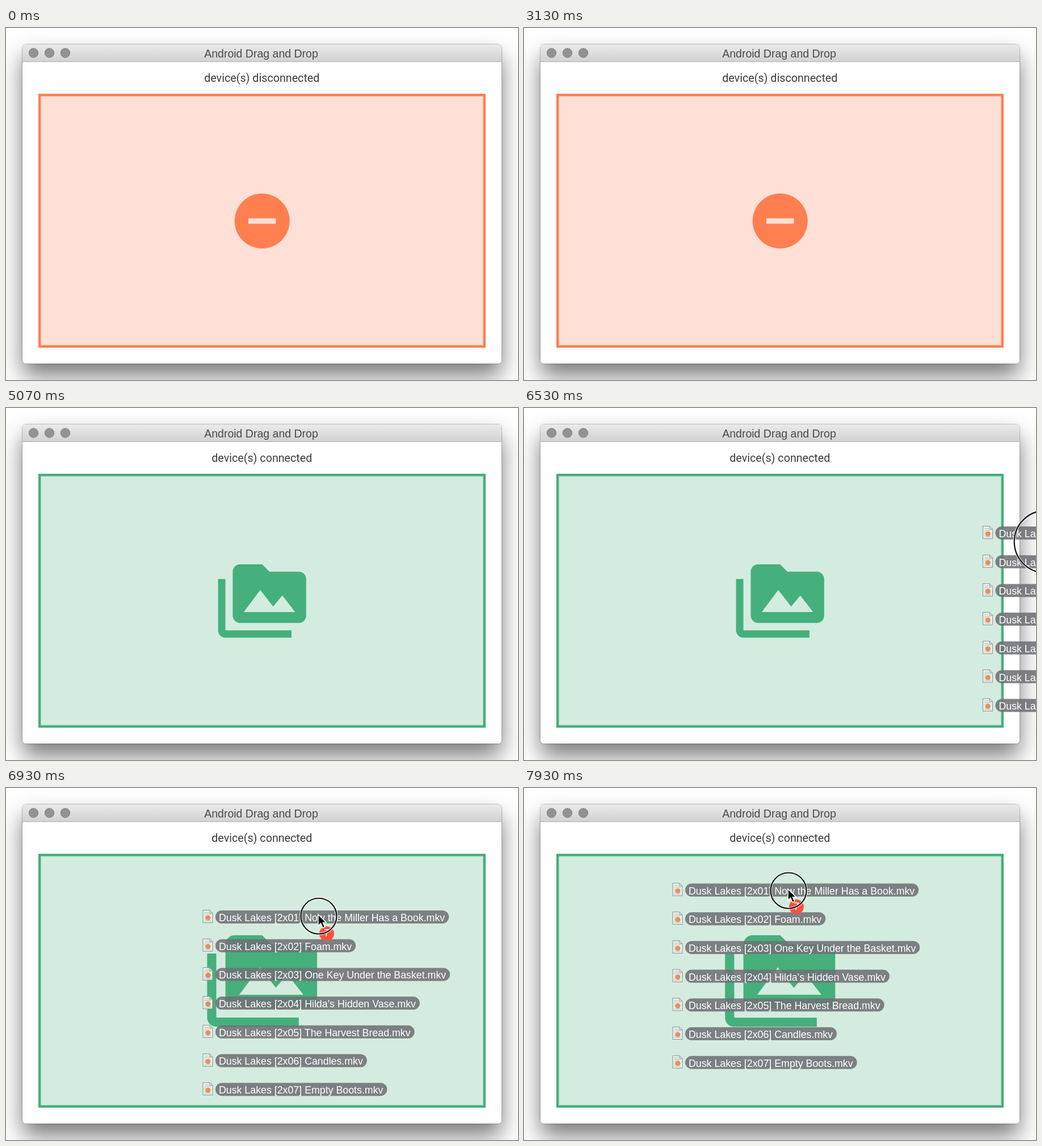
These frames come from a looping animation (902x621 px, 8 s). An HTML page:

```html
<!DOCTYPE html>
<html lang="en">
<head>
<meta charset="utf-8">
<title>Drag and Drop</title>
<style>
  html, body { margin: 0; width: 902px; height: 621px; overflow: hidden; background: #fff; }
  #win {
    position: absolute; left: 29px; top: 28.5px; width: 844px; height: 563.5px;
    background: #fff; border-radius: 6px; overflow: hidden;
  }
  #shadow {
    position: absolute; left: 29px; top: 28.5px; width: 844px; height: 563.5px; border-radius: 6px;
    box-shadow: 0 0 1px 0.5px rgba(0,0,0,.4), 0 22px 40px rgba(0,0,0,.52);
  }
  #bar {
    height: 30px; border-bottom: 1px solid #b3b2b3;
    background: linear-gradient(#ebeaeb, #d3d2d3);
  }
  svg { position: absolute; left: 0; top: 0; }
  text { font-family: "Liberation Sans", Arial, sans-serif; }
  #status { font: 19.7px Roboto, sans-serif; fill: #3d3c3e; }
  #files text { font-size: 17.8px; fill: #fff; }
</style>
</head>
<body>
<div id="shadow"></div>
<div id="win"><div id="bar"></div></div>
<svg width="902" height="621" viewBox="0 0 902 621">
  <g fill="#939196" stroke="#858388">
    <circle cx="48.5" cy="44" r="8.2"/><circle cx="76.5" cy="44" r="8.2"/><circle cx="104.5" cy="44" r="8.2"/>
  </g>
  <text x="449.5" y="51.5" font-size="19.5" fill="#4a494b" text-anchor="middle">Android Drag and Drop</text>
  <text id="status" x="450.8" y="95" text-anchor="middle"></text>

  <g>
    <rect x="59.2" y="118.2" width="783.6" height="443.6" fill="#fee0d6" stroke="#ff7f50" stroke-width="4.4"/>
    <path class="icon" fill="#ff7f50" d="M12 2a10 10 0 1 0 0 20a10 10 0 1 0 0-20zM17 13H7v-2h10z"/>
  </g>
  <g id="ready">
    <rect x="59.2" y="118.2" width="783.6" height="443.6" fill="#d3ecdf" stroke="#45b07c" stroke-width="4.4"/>
    <path class="icon" fill="#45b07c" d="M2 6H0v14c0 1.1.9 2 2 2h18v-2H2zM22 4h-8l-2-2H6c-1.1 0-2 .9-2 2v12c0 1.1.9 2 2 2h16c1.1 0 2-.9 2-2V6c0-1.1-.9-2-2-2zM7 15l4.5-6 3.5 4.5 2.5-3L21 15z"/>
  </g>

  <g id="drag">
    <g id="files"></g>
    <g id="pointer">
      <circle class="ring" fill="none" stroke="#fff" stroke-opacity=".75" stroke-width="4.6"/>
      <circle class="ring" fill="none" stroke="#111" stroke-width="2.2"/>
      <path d="M-1-3v20l4.6-4.2 3.4 8 3.8-1.6-3.4-7.8h6z" fill="#000" stroke="#fff" stroke-width="1.5"/>
    </g>
  </g>
</svg>
<script>
const $ = id => document.getElementById(id);
const icons = document.querySelectorAll('.icon');
const rings = document.querySelectorAll('.ring');
const LOOP = 8000, STEP = 1000 / 15;
const CONNECT = 3980, GRAB = 6530, HOVER = 6620;

const titles = ['Now the Miller Has a Book', 'Foam', 'One Key Under the Basket',
  "Hilda's Hidden Vase", 'The Harvest Bread', 'Candles', 'Empty Boots'];

// time, pointer x, pointer y, file list y
const path = [
  [6533, 919, 236, 219],
  [6933, 551, 226, 226],
  [7200, 511, 182.5, 181],
  [7333, 498, 180.5, 178.5],
  [7933, 466, 181, 178.5]
];

function add(parent, tag, attrs, label = '') {
  const el = document.createElementNS('http://www.w3.org/2000/svg', tag);
  for (const key in attrs) el.setAttribute(key, attrs[key]);
  el.textContent = label;
  return parent.appendChild(el);
}

function addFile(title, i) {
  const row = add($('files'), 'g', { transform: `translate(0 ${i * 50.7})` });
  const doc = add(row, 'g', { opacity: 0.92 });
  add(doc, 'path', { d: 'M-204-10.5h12l5 5v17h-17z', fill: '#eef1ee', stroke: '#858985' });
  add(doc, 'path', { d: 'M-192-10.5v5h5', fill: 'none', stroke: '#858985' });
  add(doc, 'path', { d: 'M-201.5-6.5h8M-201.5-3.5h12M-201.5-.5h3M-201.5 2.5h3M-201.5 5.5h3M-201.5 8.5h12', stroke: '#b3b9b5' });
  add(doc, 'circle', { cx: -195, cy: 3, r: 4.6, fill: '#e58a58' });
  const pill = add(row, 'rect', { x: -182, y: -10, height: 23, rx: 11.5, fill: 'rgba(112,113,118,.88)' });
  const label = add(row, 'text', { x: -176, y: 9 }, `Dusk Lakes [2x0${i + 1}] ${title}.mkv`);
  pill.setAttribute('width', label.getComputedTextLength() + 13);
}

titles.forEach(addFile);
add($('files'), 'circle', { cx: 14, cy: 31, r: 13, fill: '#fb5140' });
add($('files'), 'text', { x: 14, y: 36.5, 'text-anchor': 'middle' }, '7');

const clamp = u => Math.min(1, Math.max(0, u));
const easeOut = (t, start, span) => 1 - (1 - clamp((t - start) / span)) ** 5;

// Monotone cubic through the path's points
function along(t, col) {
  const last = path.length - 1;
  if (t <= path[0][0]) return path[0][col];
  if (t >= path[last][0]) return path[last][col];
  const i = path.findIndex(p => p[0] > t) - 1;
  const secant = j => (path[j + 1][col] - path[j][col]) / (path[j + 1][0] - path[j][0]);
  const slope = j => {
    if (j === 0) return secant(0);
    if (j === last) return secant(last - 1);
    const a = secant(j - 1), b = secant(j);
    return a * b > 0 ? 2 * a * b / (a + b) : 0;
  };
  const span = path[i + 1][0] - path[i][0], u = (t - path[i][0]) / span, v = 1 - u;
  return path[i][col] * (1 + 2 * u) * v * v + slope(i) * span * u * v * v
    + path[i + 1][col] * u * u * (3 - 2 * u) - slope(i + 1) * span * u * u * v;
}

function draw(t) {
  const connected = easeOut(t, CONNECT, 520), hover = easeOut(t, HOVER, 500);
  $('status').textContent = t >= CONNECT ? 'device(s) connected' : 'device(s) disconnected';
  $('ready').setAttribute('opacity', connected);
  const scale = 4.85 + 1.617 * (connected + hover);
  icons.forEach(el => el.setAttribute('transform', `translate(451.2 340.5) scale(${scale}) translate(-12 -12)`));

  $('drag').style.display = t >= GRAB ? '' : 'none';
  const x = along(t, 1), lag = (1 - clamp((t - path[0][0]) / 220)) ** 2;
  $('files').setAttribute('transform', `translate(${x + 94 * lag} ${along(t, 3)})`);
  $('pointer').setAttribute('transform', `translate(${x} ${along(t, 2)})`);
  rings.forEach(el => el.setAttribute('r', 31.5 + 23.5 * lag));
}

// Motion runs at 15 steps per second
function tick() {
  const t = performance.now() % LOOP;
  draw(Math.floor(t / STEP + 0.06) * STEP % LOOP);
  requestAnimationFrame(tick);
}
tick();
</script>
</body>
</html>
```
